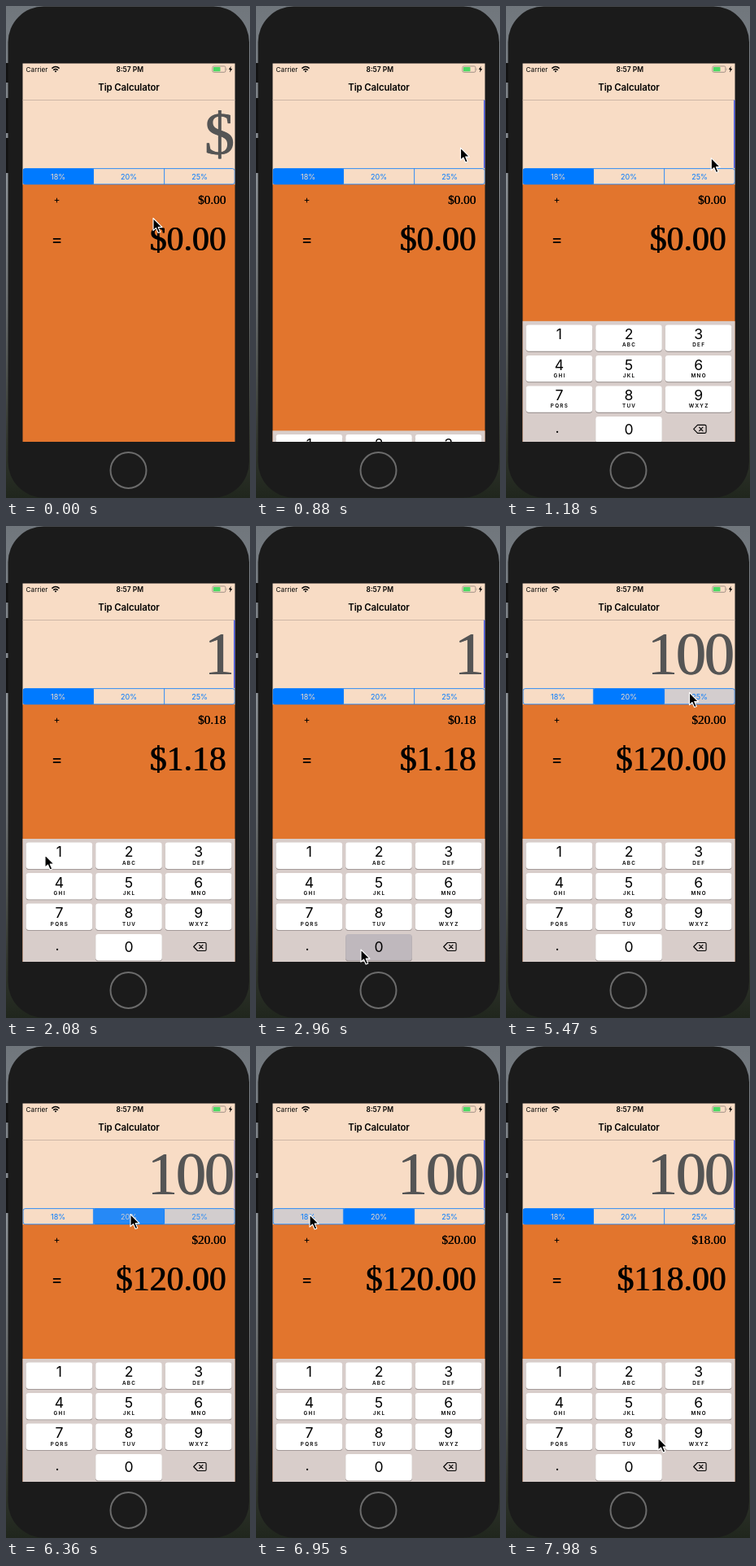
An HTML page for the animation above (8000 ms loop, 300 px wide and 604 px high).

```html
<!DOCTYPE html>
<html lang="en">
<head>
<meta charset="utf-8">
<title>Tip Calculator</title>
<style>
  html, body { margin: 0; height: 100%; overflow: hidden; background: #1b1b1b; }
  svg { display: block; width: 100vw; height: 100vh; }
  text { font-family: Inter, Roboto, sans-serif; text-anchor: middle; }
  .amount text { font-family: "Liberation Serif", "Noto Serif", serif; text-anchor: end; }
  .segments text { font-size: 9px; }
  .digit { font-size: 17.6px; }
  .letters { font-size: 6.3px; font-weight: 600; letter-spacing: 1.3px; }
</style>
</head>
<body>
<svg viewBox="0 0 300 604" xmlns="http://www.w3.org/2000/svg">
  <defs>
    <linearGradient id="desk" x2="0" y2="1">
      <stop offset="0" stop-color="#70767c"/>
      <stop offset=".35" stop-color="#8d9297"/>
      <stop offset=".6" stop-color="#6b6e70"/>
      <stop offset=".88" stop-color="#33372f"/>
      <stop offset="1" stop-color="#20261d"/>
    </linearGradient>
    <clipPath id="screen"><rect x="20.5" y="70.5" width="261" height="464.5"/></clipPath>
  </defs>

  <rect width="300" height="604" fill="url(#desk)"/>
  <path d="M0 70h3v24H0zM0 113h3v43H0zM0 162h3v43H0z" fill="#111"/>
  <rect x="2.5" y=".5" width="296.5" height="603" rx="44" fill="#1b1b1b"/>
  <circle cx="150.5" cy="570" r="22" fill="#1b1b1b" stroke="#6b6b6b" stroke-width="2"/>

  <g clip-path="url(#screen)">
    <rect x="20" y="70" width="262" height="149.5" fill="#f8dcc5"/>
    <rect x="20" y="219" width="262" height="317" fill="#e2752d"/>
    <path d="M20 115.5h262" stroke="#c3ada0" stroke-width=".8"/>

    <text x="38" y="81" font-size="8.2">Carrier</text>
    <text x="152.3" y="81" font-size="8.5" font-weight="600">8:57 PM</text>
    <text x="151" y="104" font-size="11.4" font-weight="600" letter-spacing="-.1">Tip Calculator</text>
    <g fill="none" stroke="#000" stroke-width="1.5">
      <path d="M56.4 76.6q4.6-4.2 9.2 0M58.2 78.7q2.8-2.5 5.6 0"/>
      <path d="M59.6 80q1.4-1.3 2.8 0L61 81.6z" fill="#000" stroke="none"/>
    </g>
    <rect x="253.9" y="73.9" width="16" height="7.4" rx="1.6" fill="none" stroke="#8d8078" stroke-width=".8"/>
    <rect x="255" y="75" width="8.5" height="5.2" rx=".6" fill="#4cd964"/>
    <path d="M270.9 76.2q1.2 1.4 0 2.8z" fill="#8d8078"/>
    <path d="M276.8 73.8l-3 4.2h1.9l-.7 3.4 3.2-4.5h-2z"/>

    <g class="amount" fill="#555">
      <text id="bill" x="278.4" y="182" font-size="74" letter-spacing="-2"></text>
      <use href="#bill" x="1"/>
    </g>
    <rect id="caret" x="280" y="115.5" width="1.8" height="83.5" fill="#4256ee"/>

    <g class="segments" id="segments"></g>

    <text x="62.5" y="242.3" font-size="12">+</text>
    <text x="62.5" y="294" font-size="21.5">=</text>
    <g class="amount">
      <text id="tip" x="270.3" y="243" font-size="15.3"></text>
      <use href="#tip" x=".3"/>
      <text id="total" x="270.4" y="300" font-size="41.8"></text>
      <use href="#total" x=".8"/>
    </g>

    <g id="keyboard">
      <rect x="20" y="384" width="262" height="152" fill="#d8cdca"/>
      <g id="keys"></g>
      <text class="digit" x="63" y="521">.</text>
      <g fill="none" stroke="#000" stroke-width="1.1" stroke-linecap="round" stroke-linejoin="round">
        <path d="M235.5 511.5h9q1.6 0 1.6 1.6v6.8q0 1.6-1.6 1.6h-9l-4.8-5z"/>
        <path d="M237.6 514.3l4.4 4.4m0-4.4l-4.4 4.4"/>
      </g>
    </g>
  </g>

  <path id="pointer" d="M0 0V15.2L3.5 12 6.1 18 8.7 16.9 6.2 11.1H11Z"
        stroke="#fff" stroke-width="1.1" stroke-linejoin="round"/>
</svg>

<script>
const LOOP = 8000, STEP = 147.9;
const BLUE = '#007aff', PEACH = '#f8dcc5';
const RATES = [18, 20, 25];
const LETTERS = ['', 'ABC', 'DEF', 'GHI', 'JKL', 'MNO', 'PQRS', 'TUV', 'WXYZ'];

// [time, value]
const bills = [[0, '$'], [2065, '1'], [3100, '10'], [3690, '100']];
const choices = [[0, 0], [4850, 1], [5600, 2], [6190, 1], [7080, 0]];
// [from, to, index]
const keyTaps = [[1915, 2065, 1], [2945, 3100, 0], [3545, 3690, 0]];
const segTaps = [[4710, 4850, 1], [5460, 5600, 2], [6050, 6190, 1], [6940, 7080, 0]];
// [time, x, y]
const path = [
  [60, 181, 260.5], [600, 251.5, 174], [880, 251.5, 174], [1180, 252.3, 186.5],
  [1630, 16, 402], [1780, 48, 404], [2100, 48, 404], [2850, 129, 520],
  [3650, 129, 520], [4140, 142.5, 236], [4600, 151, 207], [4860, 151, 207],
  [5400, 225.5, 204.5], [5630, 225.5, 204.5], [6050, 153, 206.5],
  [6380, 153, 206.5], [6900, 66, 207], [7120, 66, 207], [7960, 187, 481]
];

const $ = id => document.getElementById(id);
const clamp = v => Math.min(1, Math.max(0, v));

function add(parent, tag, attrs, text = '') {
  const el = document.createElementNS('http://www.w3.org/2000/svg', tag);
  for (const name in attrs) el.setAttribute(name, attrs[name]);
  el.textContent = text;
  return parent.appendChild(el);
}

function addKey(n) {
  const col = n ? (n - 1) % 3 : 1, row = n ? Math.floor((n - 1) / 3) : 3;
  const x = 24.6 + col * 85.6, y = 388.6 + row * 37.5;
  const box = { x, y, width: 81.6, height: 32.3, rx: 3.4 };
  add($('keys'), 'rect', { ...box, y: y + .9, fill: '#938a88' });
  const face = add($('keys'), 'rect', box);
  add($('keys'), 'text', { class: 'digit', x: x + 40.8, y: y + (n ? 17.8 : 21.8) }, n);
  if (n > 1) add($('keys'), 'text', { class: 'letters', x: x + 41.4, y: y + 27 }, LETTERS[n - 1]);
  return face;
}

function addSegment(rate, i) {
  const x = 20.8 + i * 87;
  return {
    fill: add($('segments'), 'rect', { x, y: 199.5, width: 87, height: 19.5, rx: 2, fill: BLUE }),
    label: add($('segments'), 'text', { x: x + 43.3, y: 212.6 }, rate + '%')
  };
}

const keys = Array.from({ length: 10 }, (_, n) => addKey(n));
const segments = RATES.map(addSegment);
add($('segments'), 'rect', { x: 21, y: 199.6, width: 260.2, height: 19.2, rx: 2.8, fill: 'none', stroke: BLUE, 'stroke-width': .8 });
add($('segments'), 'path', { d: 'M107.4 199.6v19.2M194.6 199.6v19.2', stroke: BLUE, 'stroke-width': .8 });

const lastIndex = (list, t) => list.findLastIndex(e => t >= e[0]);
const tapped = (list, t, i) => list.some(([from, to, n]) => n === i && t >= from && t < to);

function pointerAt(t) {
  const i = lastIndex(path, t);
  if (i < 0) return path[0].slice(1);
  if (i === path.length - 1) return path[i].slice(1);
  const [t0, x0, y0] = path[i], [t1, x1, y1] = path[i + 1];
  const p = (t - t0) / (t1 - t0), e = p * p * (3 - 2 * p);
  return [x0 + (x1 - x0) * e, y0 + (y1 - y0) * e];
}

function caretAt(t) {
  if (t < 870) return 0;
  if (t > 2050 && t < 4250) return 1;
  const off = Math.abs((t / 1000 + .42) % 1 - .5);
  return clamp((.31 - off) / .1);
}

// Critically damped spring
function keyboardOffset(t) {
  const w = Math.max(0, t - 860) * .01826;
  return 151 * (1 + w) * Math.exp(-w);
}

function drawSegments(t) {
  const i = lastIndex(choices, t), [since, now] = choices[i];
  const before = i ? choices[i - 1][1] : now;
  const mix = i ? clamp((t - since) / 200) : 1;
  segments.forEach(({ fill, label }, n) => {
    let level = n === now ? mix : n === before ? 1 - mix : 0;
    label.style.fill = `color-mix(in srgb, ${PEACH} ${level * 100}%, ${BLUE})`;
    if (tapped(segTaps, t, n)) level = Math.max(level, .15);
    fill.setAttribute('fill-opacity', level);
  });
  return RATES[now];
}

function draw(t) {
  const rate = drawSegments(t);
  const bill = bills[lastIndex(bills, t)][1];
  const sum = Number(bill) || 0, tip = sum * rate / 100;
  $('bill').textContent = bill === '$' && t >= 870 ? '' : bill;
  $('tip').textContent = '$' + tip.toFixed(2);
  $('total').textContent = '$' + (sum + tip).toFixed(2);
  $('caret').setAttribute('opacity', caretAt(t));
  $('keyboard').setAttribute('transform', `translate(0 ${keyboardOffset(t)})`);
  keys.forEach((key, n) => key.setAttribute('fill', tapped(keyTaps, t, n) ? '#bfb8bd' : '#fff'));
  $('pointer').setAttribute('transform', `translate(${pointerAt(t)})`);
}

function frame() {
  const t = performance.now() % LOOP;
  draw(Math.floor((t + 8) / STEP) * STEP);
  requestAnimationFrame(frame);
}
frame();
</script>
</body>
</html>
```
